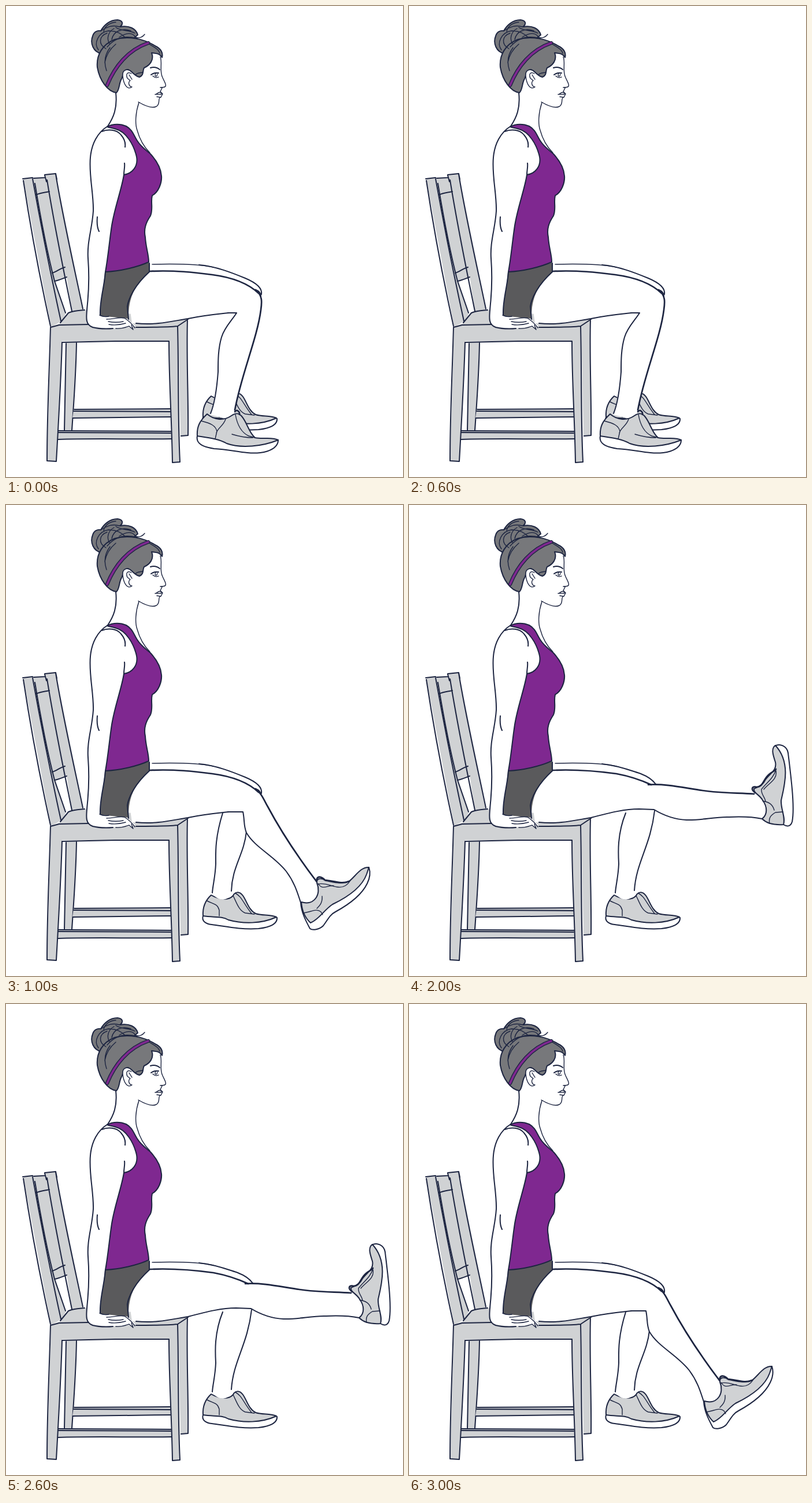
Write an HTML page without scripts that moves like this. It is 687 by 815 pixels and loops after 4 s.

```html
<!DOCTYPE html>
<html lang="en">
<head>
<meta charset="utf-8">
<title>Seated leg raise</title>
<style>
html, body { margin: 0; width: 100%; height: 100%; overflow: hidden; background: #fff; }
svg { display: block; width: 100%; height: 100%; }
path { fill: none; stroke: #1d2541; stroke-width: 2; stroke-linecap: round; stroke-linejoin: round; }
.thin path, path.thin { stroke-width: 1.4; }
path.bold { stroke-width: 2.7; }
path.fill { stroke: none; }
.skin { fill: #fff; }
.wood, .shoe { fill: #d0d2d4; }
.hair path { fill: #77787b; }
.shirt { fill: #7f2890; }
.shorts { fill: #5a5a5c; }
.band { stroke-width: 6.5; }
.band + .band { stroke: #7f2890; stroke-width: 3.8; }

/* Three poses, hard cuts: down, half, up, half */
.down, .half, .up { animation: down 4s step-end infinite; }
.half { animation-name: half; }
.up { animation-name: up; }
@keyframes down { 0% { visibility: visible } 25%, 100% { visibility: hidden } }
@keyframes half { 0%, 50% { visibility: hidden } 25%, 75%, 100% { visibility: visible } }
@keyframes up { 0%, 75%, 100% { visibility: hidden } 50% { visibility: visible } }
</style>
</head>
<body>
<svg viewBox="0 0 687 815">
  <defs>
    <g id="rearThigh">
      <path class="fill skin" d="M249 447C300 445 350 446 390 461C420 470 443 482 442 500L380 500L249 460Z"/>
      <path class="thin" d="M253 447C290 446 330 446 359 452"/>
      <path d="M334 448C362 450 392 462 414 471C433 479 444 488 442 499"/>
      <path d="M428 491C437 491 441 496 441 503"/>
    </g>
    <path id="thighTop" class="bold" d="M249 459C292 457 326 461 357 465C395 470 420 481 437 497"/>
    <path id="thighBase" d="M225 549C260 553 289 545 315 541C345 535 368 533 386 531"/>
    <path id="headband" d="M175 137C188 105 211 76 246 64"/>
  </defs>

  <g id="chair">
    <path class="fill wood" d="M104 582H122L115 735H101ZM298 553L314 541L315 743L302 744Z"/>
    <path d="M104 584L101 734M122 583C121 640 117 690 114 734M314 542C312 610 316 680 315 743L303 744"/>
    <path class="fill wood" d="M117 698H286V712H115ZM90 735H287V749H90Z"/>
    <path d="M118 698L284 697M117 701L285 702M116 713L285 711"/>
    <path d="M90 735L286 736M91 738L285 739M90 750C150 748 220 750 286 749"/>
    <path class="fill wood" d="M30 299L47 297L67 298V292L86 290L134 527L114 529L105 468L85 476L103 533L98 544L78 556Z"/>
    <path class="fill wood" d="M78 555L94 549L108 530L135 526L318 541L298 554L301 789H288L281 580H97L87 787H71Z"/>
    <path d="M29 299L46 297M30 302C43 388 58 468 77 554M46 299C61 382 77 463 95 545"/>
    <path d="M50 307C60 368 72 430 84 476L103 531"/>
    <path d="M48 298L67 297M67 292L86 290L88 300M67 293L70 304M71 301C82 370 99 455 114 528M86 291C99 370 118 452 133 524"/>
    <path d="M52 327C59 323 67 323 75 321M80 462C87 460 94 454 102 452M84 476C91 475 99 471 105 469M94 548L108 531C117 527 126 527 136 526"/>
    <path d="M77 556L92 552L143 551M225 556C252 556 278 556 297 554L315 542M77 556C75 632 71 708 71 787L87 788C91 718 95 650 97 582L189 580L282 580C282 650 287 720 288 790L301 789C297 711 299 632 297 554"/>
  </g>

  <use href="#rearThigh" class="down"/>
  <use href="#rearThigh" class="half"/>
  <g class="up">
    <path class="fill skin" d="M249 447C300 445 350 446 390 461L428 484L380 500L249 460Z"/>
    <path class="thin" d="M253 447C290 446 330 446 359 452"/>
    <path d="M334 448C364 451 385 460 401 465C414 470 421 475 427 483"/>
  </g>

  <g id="rearShoe">
    <path class="fill skin" d="M341 710C339 719 345 725 356 726C380 729 404 735 437 733C452 731 466 727 470 717Z"/>
    <path class="shoe" d="M355 675C344 685 340 697 341 711C360 714 373 711 385 718C410 725 442 725 468 713C456 708 444 711 432 707C420 701 417 686 410 676C404 668 396 669 393 676C386 684 371 684 355 675Z"/>
    <path d="M341 711C338 720 346 725 356 726C380 729 404 735 437 733C454 731 470 726 469 714"/>
    <path class="thin" d="M348 685C360 691 366 690 369 701L369 711M393 676C399 688 403 702 414 706L430 708M397 672C408 677 411 690 425 707"/>
  </g>

  <g class="half">
    <path class="fill skin" d="M374 532C357 590 369 620 357 672C367 687 385 686 391 671C393 630 413 600 417 562L409 531Z"/>
    <path d="M375 533C361 578 363 603 363 621C362 644 358 657 357 671M416 565C412 605 391 626 390 668"/>
  </g>
  <g class="up">
    <path class="fill skin" d="M374 530C357 590 369 620 357 672C367 687 385 686 391 671C393 630 416 590 425 528Z"/>
    <path d="M375 533C360 570 362 603 363 621C362 644 358 657 357 671M425 529C418 590 393 618 390 667"/>
  </g>

  <g class="down">
    <path class="fill skin" d="M211 500L248 459C300 457 365 464 410 479C430 488 443 499 442 514C440 580 407 640 396 704L382 714L353 707C371 660 360 606 374 565L398 531C340 531 300 547 250 551L218 549Z"/>
    <use href="#thighTop"/>
    <path class="bold" d="M432 491C444 501 443 512 441 526C435 574 407 638 396 699"/>
    <use href="#thighBase"/>
    <path d="M384 531L399 531C391 544 378 556 373 573C367 593 367 614 367 633C365 660 361 688 354 705"/>
    <path class="fill skin" d="M331 744C328 758 343 764 360 766C390 767 414 776 440 773C455 770 469 762 471 752Z"/>
    <path class="shoe" d="M348 706C335 718 330 728 331 744C350 747 368 749 382 757C407 766 444 762 471 751C459 745 446 750 431 747C420 738 418 722 408 710C402 703 396 705 390 709C377 718 361 717 348 706Z"/>
    <path d="M331 744C328 758 342 763 360 766C390 767 414 776 440 773C456 771 471 764 471 751"/>
    <path class="thin" d="M338 718C354 722 363 726 365 736L362 749M380 715C376 727 366 730 364 739M397 707C400 724 407 738 420 744L431 747M391 741C404 745 416 747 427 747"/>
    <path class="bold" d="M396 702C399 697 405 702 404 707"/>
  </g>

  <g class="half">
    <path class="fill skin" d="M211 500L248 459C300 457 365 464 410 479C425 485 438 492 444 507L488 585L537 653L541 678L512 690C503 656 480 633 455 611C433 593 414 578 414 553L409 531C340 531 300 547 250 551L218 549Z"/>
    <use href="#thighTop"/>
    <path class="bold" d="M432 491C443 500 446 510 453 522C477 567 509 614 537 651"/>
    <use href="#thighBase"/>
    <path d="M384 531L410 531C413 544 411 555 416 567C431 593 464 607 485 634C500 654 505 673 510 688"/>
    <path class="fill skin" d="M511 688C515 713 521 733 531 735C550 731 555 713 570 704C592 692 615 676 625 655L629 629Z"/>
    <path class="shoe" d="M511 687C512 700 516 713 527 723C542 717 550 701 565 691C588 680 615 664 624 639L628 627C614 626 606 641 594 651C579 657 566 652 553 650C545 644 537 646 538 654C546 673 534 694 511 687Z"/>
    <path d="M510 688C511 705 519 720 526 733C531 737 543 734 549 728C556 719 560 709 570 704C592 692 615 676 625 655C630 645 631 636 628 627"/>
    <path class="thin" d="M514 706C527 705 537 697 545 704L548 709M540 656C553 653 563 660 573 661C584 663 592 657 596 649M540 655C548 668 557 657 567 659M547 677C548 689 542 694 538 698"/>
    <path class="bold" d="M537 651C538 640 546 643 552 649C566 650 581 657 594 651"/>
  </g>

  <g class="up">
    <path class="fill skin" d="M211 500L248 459C300 457 370 465 420 483C480 486 540 501 602 499L617 520L612 544C574 540 538 542 506 544C472 547 445 536 424 526C350 527 300 547 250 551L218 549Z"/>
    <path class="bold" d="M249 459C292 457 330 461 359 465C386 470 406 478 419 484"/>
    <path class="bold" d="M414 484C447 482 478 490 508 494C540 499 569 498 597 500"/>
    <path d="M225 549C260 553 289 545 315 541C349 532 374 526 398 526L424 527C442 538 461 544 480 545C507 546 529 539 554 540C576 539 596 540 611 543"/>
    <path class="fill skin" d="M634 416C651 414 656 423 658 438C662 474 668 525 663 548C660 558 647 557 637 554L646 510Z"/>
    <path class="shoe" d="M634 416C626 421 630 433 634 445C637 459 625 464 617 475C611 487 605 487 597 491C596 499 607 501 612 511C620 522 621 535 611 543C619 551 633 554 648 553C652 540 643 526 644 511C650 485 661 445 634 416Z"/>
    <path d="M633 417C642 412 654 417 656 429C661 471 668 523 663 548C660 558 653 556 648 553"/>
    <path class="thin" d="M624 551C622 541 626 537 634 532L647 531M635 458C631 473 617 482 610 492C609 501 616 505 617 513M635 460C638 475 623 481 614 492M612 512C622 514 629 517 632 528"/>
    <path class="bold" d="M599 498C591 492 593 486 602 488C613 487 613 475 622 467C628 461 633 461 635 457"/>
  </g>

  <g id="body">
    <path class="fill skin" d="M190 145C193 180 188 194 174 208C153 224 145 250 146 278C153 328 149 355 147 383C139 408 141 450 142 497C139 520 137 545 145 552C158 560 190 557 215 556L224 554L206 538L164 535L172 458L205 290L240 250C226 225 220 207 230 166C240 170 254 179 263 171C266 164 263 161 269 155L268 144L277 138C269 125 268 112 270 92L250 70L200 100Z"/>
    <path class="shorts fill" d="M171 460C198 458 224 452 247 444L249 460C223 483 211 505 212 541L163 536C163 513 169 488 171 460Z"/>
    <path class="shirt" d="M175 209C186 203 199 204 208 208C219 214 221 224 227 233C233 243 243 250 250 256C260 267 268 279 269 294C270 306 264 322 253 328C250 340 255 350 250 363C242 375 238 386 241 400C242 418 247 430 247 443C227 452 197 459 172 460C177 432 179 406 183 380C188 348 200 318 204 292C218 290 229 278 226 261C221 239 207 217 190 213C185 211 179 211 175 209Z"/>
    <path d="M172 460C170 488 162 508 163 535M248 445L248 460C223 483 212 505 210 520L212 542"/>
    <path d="M190 150C193 177 186 193 176 208C158 219 148 239 146 262C143 292 152 326 151 355C149 386 140 408 142 437C144 464 143 495 141 515C139 538 136 551 150 556C165 560 185 558 185 558"/>
    <path d="M166 217C176 213 191 213 199 223C205 230 207 238 206 244M205 272C206 278 204 284 204 292M158 365C157 376 158 384 161 390"/>
    <path class="thin" d="M162 535C168 538 173 538 178 537M174 542C187 542 194 538 205 540C213 545 218 550 223 557M177 546C187 548 193 548 203 546M178 551C189 553 200 551 207 549M190 558C201 559 207 556 213 554L220 560L217 552"/>
    <path class="thin" d="M230 167C224 185 223 204 227 215C231 230 238 243 249 254M229 166C239 172 251 178 260 174C268 169 262 161 267 158"/>
  </g>

  <g id="head">
    <path class="thin" d="M267 88C271 99 265 113 271 124C274 131 278 136 276 139C274 142 270 140 267 141M270 142L267 148L271 152L268 158M270 152C266 154 262 152 258 153M259 153C264 150 265 148 270 151M261 157L267 158"/>
    <path d="M251 119C255 116 259 115 264 116M250 107C256 105 261 106 266 110"/>
    <path class="thin" d="M254 121C259 125 261 124 264 123M259 117C256 122 261 124 262 118"/>
    <g class="hair">
      <path d="M165 82C151 80 145 64 150 52C152 44 159 42 164 43C169 34 179 24 193 24C202 25 204 31 197 36C213 33 225 39 228 50L218 58L188 62Z"/>
      <path d="M191 150C176 148 162 129 158 106C156 85 167 66 188 58C212 51 239 57 258 69C269 74 272 82 270 89C265 81 259 82 252 81C257 94 248 103 239 107C236 112 239 120 231 123C222 121 219 113 211 110C202 110 203 121 200 126C195 134 197 145 191 150Z"/>
    </g>
    <use href="#headband"/>
    <path class="band" d="M175 137C188 105 211 76 246 64"/>
    <path class="band" d="M175 137C188 105 211 76 246 64"/>
    <g class="thin">
      <path d="M164 43C175 36 185 32 196 36M160 76C151 64 160 46 177 43C192 43 200 48 207 55M173 74C159 66 161 52 175 47M169 44C171 34 180 29 190 28M183 58C186 43 201 38 216 43M187 39C176 45 174 57 179 65M196 54C208 46 219 45 224 54C231 57 237 53 240 49M175 71C190 53 208 51 226 56M190 37C201 45 211 40 223 47"/>
      <path d="M180 72C171 84 169 98 174 112M190 66C178 76 173 86 171 98M224 119C228 115 232 116 236 115M248 66C258 72 265 76 266 82"/>
      <path class="skin" d="M218 140C209 147 203 133 202 121C201 109 211 108 217 114"/>
      <path d="M217 117C210 113 207 118 210 125L215 129C211 132 212 138 217 140M213 119L218 127"/>
    </g>
  </g>
</svg>
</body>
</html>
```
